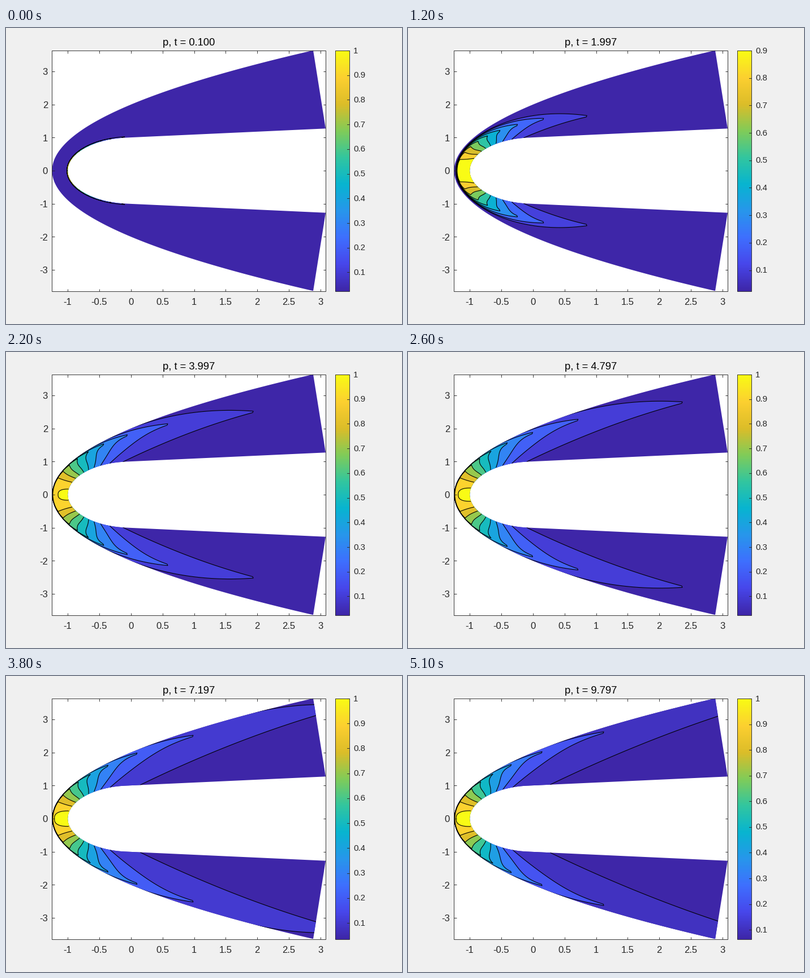
These frames come from a looping animation (700x525 px, 5.2 s). A matplotlib script:

```python
import numpy as np
import matplotlib.pyplot as plt
from matplotlib.animation import FuncAnimation
from matplotlib.colors import LinearSegmentedColormap
from matplotlib.patches import PathPatch, Polygon, Rectangle
from matplotlib.path import Path

W, H, DPI, FRAMES = 700, 525, 100, 52
PX = 72 / DPI                      # points per pixel
CX, CY, SX, SY = 220.8, 253, 111.75, 58.67
LEFT, RIGHT, TOP, BOTTOM = 81, 565, 40, 467
BAR_L, BAR_R = 582, 607
NOSE = CX - 1.247 * SX             # vertex of the inflow parabola
CONE = np.radians(5)
INK = "#262626"

plt.rcParams["font.family"] = "Liberation Sans"

PARULA = LinearSegmentedColormap.from_list("parula", [
    (.242, .150, .660), (.280, .278, .922), (.244, .436, .999),
    (.154, .590, .922), (.030, .708, .816), (.194, .776, .625),
    (.504, .799, .348), (.863, .741, .160), (.989, .814, .189),
    (.977, .984, .081)])


def inflow_y(x):
    return CY - SY * np.sqrt(3.2 * np.maximum(x - NOSE, 0) / SX)


def body_y(x):
    X = (x - CX) / SX
    if X < -np.sin(CONE):
        return CY - SY * np.sqrt(max(1 - X * X, 0))
    return CY - SY * (np.cos(CONE) + np.tan(CONE) * (X + np.sin(CONE)))


def arc(angle):
    return np.column_stack([CX - SX * np.cos(angle), CY - SY * np.sin(angle)])


def mirror(p):
    """Append the reflection of an upper curve that ends on the axis."""
    return np.vstack([p, (p * [1, -1] + [0, 2 * CY])[::-1]])


def smooth(s):
    s = np.clip(s, 0, 1)
    return s * s * (3 - 2 * s)


def clock(n):
    if n == 0:
        return 0.1
    return 0.1 * (n + 1) - 0.002 if n < 6 else 0.2 * n - 0.403


def spread(t):
    """How far the shock has left the body, 0 to 1."""
    s = np.clip((t - 0.1) / 1.9, 0, 1)
    return 0.05 + 0.95 * (1 - (1 - s) ** 2)


def foot_of(p, age):
    """Point on the body where the pressure equals p."""
    young = 1 - (age / 7.8) ** 2
    q = p - 0.023 - 0.0152 / p + 9.7e-5 * young / p ** 3
    x = CX - SX * np.sign(q) * np.sqrt(abs(q))
    return np.array([x, body_y(x)])


def shock_side(p, t, age, u):
    """Edge of a level along the shock, from the axis to its tip."""
    r = (1 - p) / p
    settle = np.clip((3.2 - t) / 1.2, 0, 1)
    shift = 0.3 + 2.7 * settle + (p - 0.1) * (1.3 + 1.7 * settle)
    start = NOSE + shift
    lag = 0.18 * np.exp(-age / 2.6) - 0.01
    tip_x = NOSE + 3.5 + 65 * r / (1 + lag * r)
    x = start + (tip_x - start) * u ** 2

    # the edge leaves the inflow boundary at join and sinks towards the tip
    join = start + (tip_x - start) * min(1 - np.exp(-0.2 * age), 0.35 + 0.05 * r)
    fall = np.clip((x - join) / (tip_x - join), 0, None) ** 2
    drop = 12 * r ** 0.68 * (0.22 + 0.78 * np.exp(-1.9 * age / r))
    lift = np.minimum(0.015 * (x - start), 1.2) * (1 - settle)
    y = inflow_y(x - shift) - lift + (drop + lift[-1]) * fall
    return np.column_stack([x, y])


def contour(p, t):
    e, age = spread(t), max(t - 2, 0)
    foot = foot_of(p, age)
    u = np.linspace(0, 1, 90)
    end = np.arccos(np.clip((CX - foot[0]) / SX, -1, 1))
    outer = (1 - e) * arc(end * u) + e * shock_side(p, t, age, u)

    # inner side, from the body to a slightly blunt tip
    tip = outer[-1] + np.array([-1, 2.5]) * e * (p < 0.45)
    chord = tip - foot
    normal = np.array([chord[1], -chord[0]])
    v = np.linspace(0, 1, 40)[:, None]
    hump = np.sin(np.pi * p)
    bend = 0.44 * hump ** 1.3 * v * (1 - v) - 0.05 * hump ** 4 * np.sin(2 * np.pi * v)
    inner = foot + chord * v + normal * bend
    return mirror(np.vstack([inner, outer[::-1]]))


def core_size(t):
    """Relative size of the region above 1.0; it fades, then returns."""
    return max(1 - t / 1.3, 1 - np.exp((2.4 - t) / 1.3), 0)


def core(t):
    size = core_size(t) * spread(t)
    a = np.linspace(np.pi / 2, 0, 40)
    x = 111 - (24 * size + 2) * np.abs(np.cos(a)) ** 0.75
    return mirror(np.column_stack([x, CY - 14 * size * np.sin(a) ** 0.75]))


fig = plt.figure(figsize=(W / DPI, H / DPI), dpi=DPI, facecolor="#f0f0f0")
ax = fig.add_axes([0, 0, 1, 1])
ax.axis("off")


def line(xs, ys):
    ax.plot(xs, ys, color=INK, lw=0.9 * PX, zorder=6, solid_capstyle="butt")


def label(x, y, s, size, ha, color=INK):
    return ax.text(x, y, s, fontsize=size * PX, ha=ha, va="baseline",
                   color=color, zorder=7)


def frame_box(x0, x1):
    ax.add_patch(Rectangle((x0, TOP), x1 - x0, BOTTOM - TOP, fill=False,
                           ec=INK, lw=0.9 * PX, zorder=6))


ax.add_patch(Rectangle((LEFT, TOP), RIGHT - LEFT, BOTTOM - TOP, fc="w", ec="none"))

# flow domain between inflow parabola and blunt body
rise = np.linspace(213.3, 0, 200)
edge = np.column_stack([NOSE + SX * (rise / SY) ** 2 / 3.2, CY - rise])
wall = np.vstack([[RIGHT, body_y(RIGHT)], arc(np.linspace(np.pi / 2 - CONE, 0, 120))])
domain = Polygon(np.vstack([mirror(edge), mirror(wall)[::-1]]),
                 fc=PARULA(0.0), ec="none", zorder=2)
ax.add_patch(domain)

regions = []
for _ in range(10):
    patch = PathPatch(Path([(0, 0), (1, 1)]), ec="k", lw=1.1 * PX, zorder=3,
                      joinstyle="round")
    ax.add_patch(patch)
    patch.set_clip_path(domain)
    regions.append(patch)

# axes frame
frame_box(LEFT, RIGHT)
for v in np.arange(-1, 3.1, 0.5):
    x = CX + v * SX
    line([x, x], [BOTTOM, BOTTOM - 4.5])
    line([x, x], [TOP, TOP + 4.5])
    label(x, 490.7, f"{v:g}", 16.67, "center")
for v in range(-3, 4):
    y = CY - v * SY
    line([LEFT, LEFT + 4.5], [y, y])
    line([RIGHT, RIGHT - 4.5], [y, y])
    label(74, y + 6.3, f"{v}", 16.67, "right")
title = label(323.5, 31, "", 18.33, "center", "k")

# colour bar
ax.imshow(np.linspace(1, 0, 256)[:, None], cmap=PARULA, vmin=0, vmax=1,
          extent=(BAR_L, BAR_R, BOTTOM, TOP), aspect="auto", zorder=2)
frame_box(BAR_L, BAR_R)
marks = []
for k in range(1, 11):
    tick, = ax.plot([], [], color=INK, lw=0.9 * PX, zorder=6)
    marks.append((tick, label(614, 0, f"{k / 10:g}", 15, "left")))

ax.set_xlim(0, W)
ax.set_ylim(H, 0)


def draw(n):
    t = clock(n)
    title.set_text(f"p, t = {t:.3f}")
    low = 0.023 + 0.04 * smooth((t - 6) / 3.4)
    high = 1.0 if core_size(t) > 0 else 0.9
    for k, (patch, (tick, text)) in enumerate(zip(regions, marks), 1):
        p = k / 10
        shown = p <= high
        for artist in (patch, tick, text):
            artist.set_visible(shown)
        if not shown:
            continue
        f = min((p - low) / (high - low), 1.0)
        patch.set_path(Path(contour(p, t) if k < 10 else core(t)))
        patch.set_facecolor(PARULA(f))
        y = BOTTOM - f * (BOTTOM - TOP)
        tick.set_data([BAR_R - 4.5, BAR_R], [y, y])
        text.set_y(y + 4.6)
    return []


anim = FuncAnimation(fig, draw, frames=FRAMES, init_func=lambda: draw(0),
                     interval=100, repeat=True, repeat_delay=0, blit=False)
plt.show()
```
